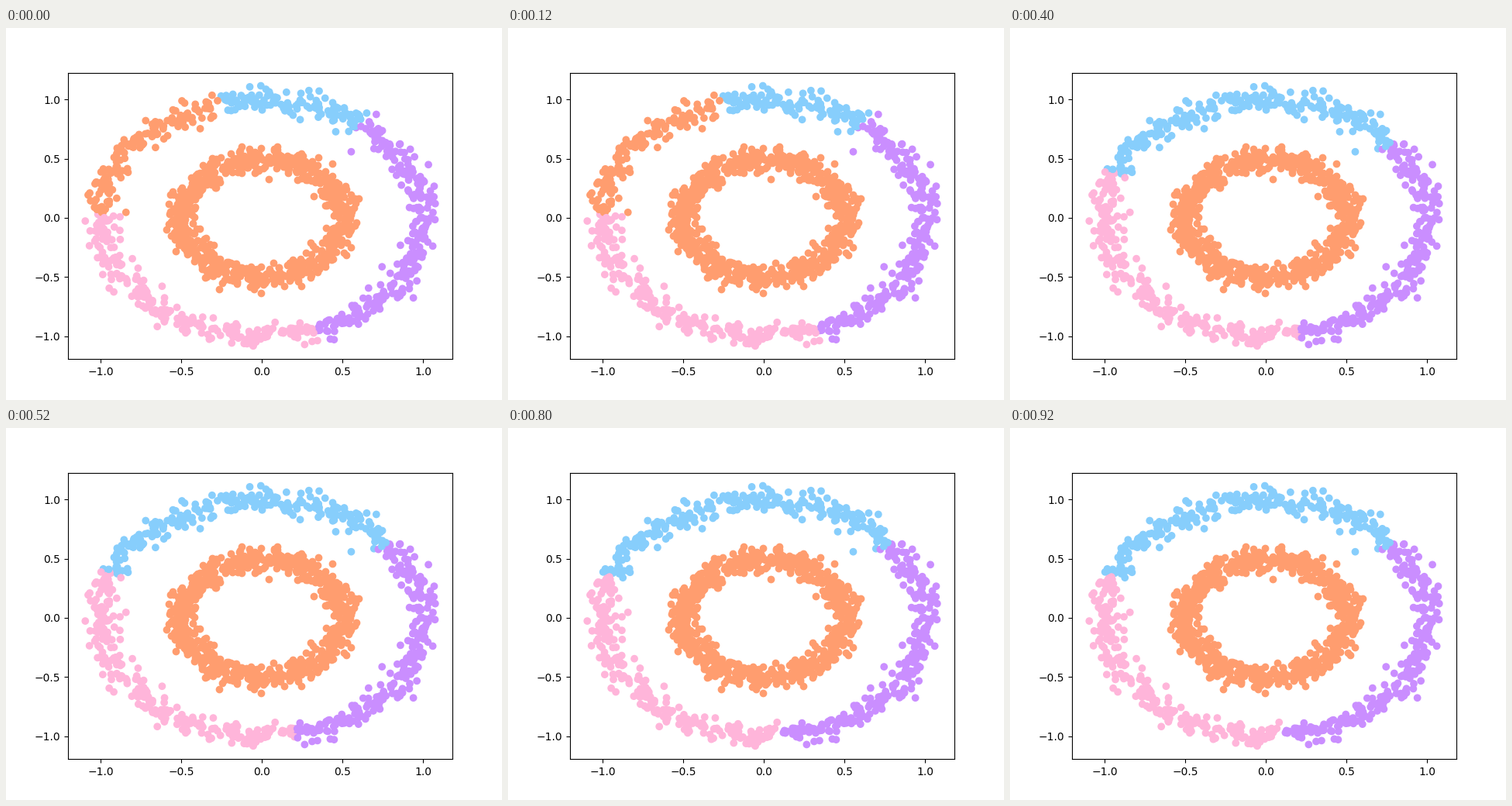
A matplotlib script for the animation above (1000 ms loop, 640 px wide and 480 px high).

```python
import numpy as np
import matplotlib.pyplot as plt
from matplotlib.animation import FuncAnimation

ORANGE, BLUE, PINK, PURPLE = "#FF9D6F", "#87CEFC", "#FFB5DA", "#CA8EFF"
SECTORS = np.array([PURPLE, BLUE, ORANGE, PINK, PURPLE])
RING_SIZE = 750
NOISE = .05

# Angles in degrees where one sector gives way to the next, per iteration.
EDGES = [
    (53, 105, 178, 290),
    (36, 153, 154.3, 291.5),
    (39, 157.5, 157.5, 282),
    (39, 160, 160, 278),
    (39, 160, 160, 276),
]


def noisy_circles(rng):
    """Two concentric rings in shuffled order, with a flag for the outer one."""
    angle = np.linspace(0, 2 * np.pi, RING_SIZE, endpoint=False)
    circle = np.column_stack([np.cos(angle), np.sin(angle)])
    points = np.vstack([circle, .5 * circle])
    order = np.arange(len(points))
    rng.shuffle(order)
    points = points[order] + rng.normal(scale=NOISE, size=points.shape)
    return points, order < RING_SIZE


def sector_colors(step):
    return SECTORS[np.searchsorted(EDGES[step], bearing)]


points, is_outer = noisy_circles(np.random.RandomState(0))
outer, inner = points[is_outer], points[~is_outer]
bearing = np.degrees(np.arctan2(outer[:, 1], outer[:, 0])) % 360

fig, ax = plt.subplots(figsize=(6.4, 4.8), dpi=100)
ax.set(xlim=(-1.202, 1.181), ylim=(-1.193, 1.227),
       xticks=np.arange(-1, 1.1, .5), yticks=np.arange(-1, 1.1, .5))
ax.scatter(*inner.T, color=ORANGE)
dots = ax.scatter(*outer.T, color=sector_colors(0))


def update(step):
    dots.set_color(sector_colors(step))
    return [dots]


anim = FuncAnimation(fig, update, frames=len(EDGES), interval=200,
                     repeat=True, repeat_delay=0)
plt.show()
```
